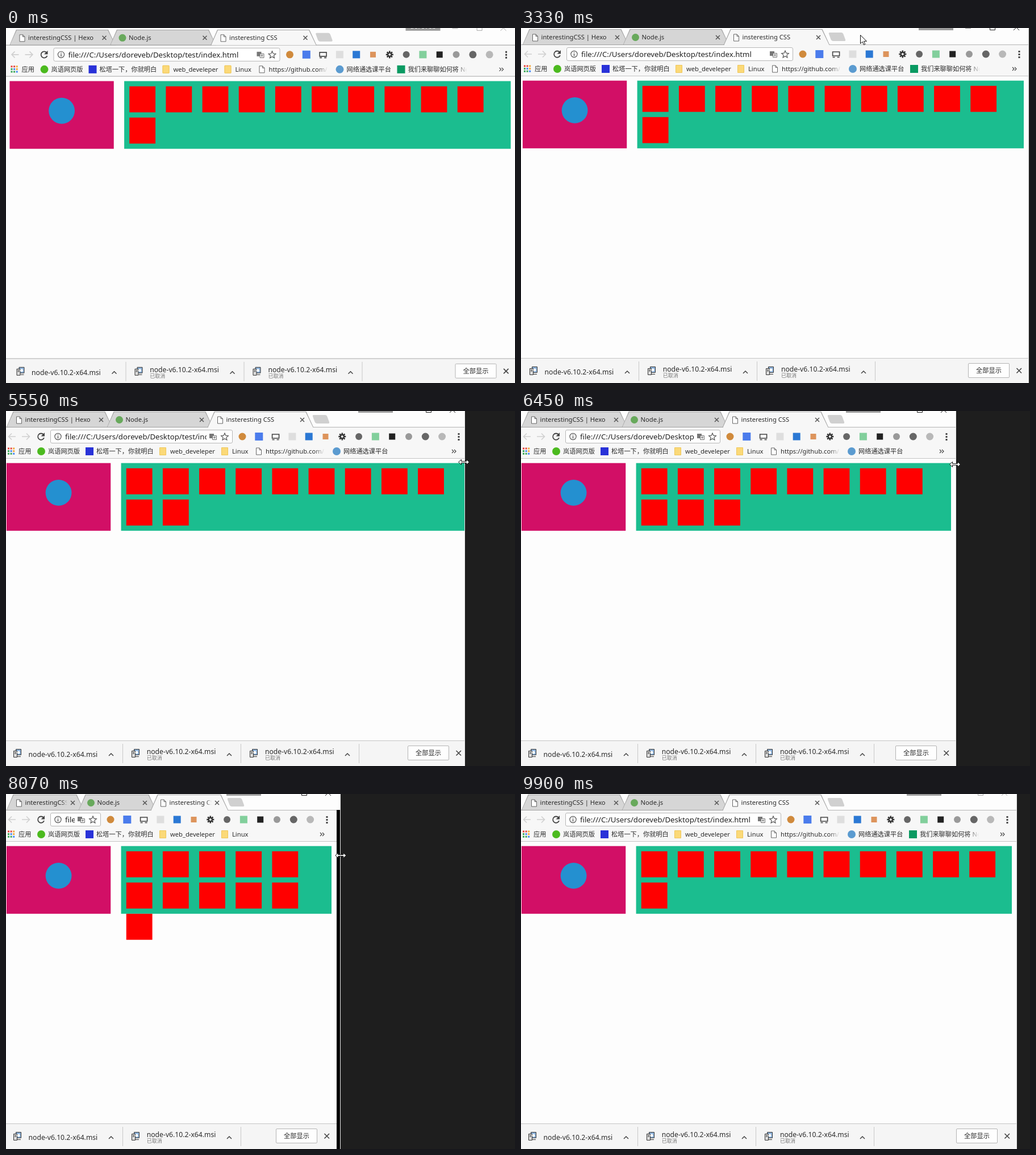
These frames come from a looping animation (896x625 px, 9930 ms). An HTML page:

```html
<!DOCTYPE html>
<html lang="zh">
<head>
<meta charset="utf-8">
<title>Resizing a window</title>
<style>
html, body { margin: 0; width: 100%; height: 100%; overflow: hidden; background: #1e1e1e; }
body { position: relative; font: 11.2px/16px "Noto Sans", "Noto Sans CJK SC", "Noto Sans CJK", sans-serif; color: #2b2b2b; }
div, span, svg { position: absolute; white-space: nowrap; }
svg { overflow: visible; }
/* The window reaches a little past the left and top of the stage. */
#win, #ui { left: 0; top: 0; height: 640px; clip-path: inset(-8px 0 0 -8px); }
#win { background: #000; }
#win::after { content: ""; position: absolute; right: 0; top: 0; width: 1px; height: 100%; background: #e8e8e8; }
#bar { left: -8px; right: 0; top: -8px; height: 36px; background: #fdfdfd; }
#btns { right: 0; top: 0; stroke: #222; fill: none; }
.idle #btns { stroke: #aaa; }
#badge { right: 133px; top: -14px; width: 61px; height: 17px; background: #9b9b9b; color: #fff; text-align: center; font-size: 12px; line-height: 18px; }

#tools, #page, #shelf { left: -8px; right: 0; box-sizing: border-box; }
#tools { top: 28px; height: 55px; background: #f7f7f7; border-top: 1px solid #b4b4b4; }
.tab { top: 1px; height: 28px; background: #a3a3a3; clip-path: polygon(0 100%, 12px 0, calc(100% - 13px) 0, 100% 100%); }
.tab::before { content: ""; position: absolute; inset: 1px 1px 1px; background: #d6d6d6; clip-path: inherit; }
.tab.on { z-index: 1; }
.tab.on::before { background: #f7f7f7; bottom: 0; }
.tab span { left: 33px; right: 30px; top: 6px; overflow: hidden; -webkit-mask: linear-gradient(90deg, #000 calc(100% - 10px), transparent); mask: linear-gradient(90deg, #000 calc(100% - 10px), transparent); }
.tab .ic { left: 15px; top: 8px; }
.tab .x { right: 16px; top: 10px; }
#plus { top: 7px; width: 31px; height: 15px; background: #d0d0d0; border-radius: 3px; transform: skewX(20deg) scaleX(.82); }

#url { left: 78px; right: 415px; top: 33px; height: 24px; border: 1px solid #b6b6b6; border-radius: 3px; background: #fff; box-sizing: border-box; }
#url span { left: 25px; right: 45px; top: 2px; overflow: hidden; font-size: 13.2px; line-height: 19px; color: #222; }
.mark { top: 63px; height: 16px; }
.mark i { position: absolute; left: -19px; top: 1px; width: 14px; height: 14px; }
.fade { -webkit-mask: linear-gradient(90deg, #000 82%, transparent); mask: linear-gradient(90deg, #000 82%, transparent); overflow: hidden; width: 104px; position: absolute; }

#page { top: 83px; height: 497px; background: #fdfdfd; border-top: 1px solid #c4c4c4; }
#shelf { top: 580px; height: 60px; background: #f5f5f5; border-top: 1px solid #c4c4c4; }
.dl { top: 5px; width: 208px; height: 34px; border-right: 1px solid #c8c8c8; box-sizing: border-box; }
.dl span { left: 42px; font-size: 12.2px; }
.dl em { position: absolute; left: 42px; top: 18px; font: 9px/14px "Noto Sans CJK SC", "Noto Sans CJK", sans-serif; color: #777; }
#all { right: 34px; top: 8px; width: 73px; height: 26px; border: 1px solid #b4b4b4; border-radius: 2px; background: #fefefe; box-sizing: border-box; text-align: center; line-height: 24px; }
.cur { left: 0; top: 0; fill: #fff; stroke: #111; }
</style>
</head>
<body>
<div id="win">
  <div id="bar"></div>
  <svg id="btns" width="110" height="28" viewBox="-110 0 110 28"><path d="M-112-1h10M-68.5-7h9v9.5h-9zM-27-7l10 10M-17-7l-10 10"/></svg>
  <div id="ui">
    <div id="badge">doreveb</div>
    <div id="tools"></div>
    <div id="plus"></div>
    <div id="url"><span>file:///C:/Users/doreveb/Desktop/test/index.html</span></div>
    <svg width="100" height="84" fill="none" stroke="#555" stroke-width="1.6">
      <path stroke="#d0d0d0" d="M17 45H5M10 39.500l-5.500 5.500 5.500 5.500M28 45h13M36 39.500l5.500 5.500-5.500 5.500"/>
      <path stroke="#444" stroke-width="1.800" d="M66 41.500a5.600 5.600 0 1 0 1 5.500"/>
      <path fill="#444" stroke="none" d="M68 38v6.500h-6.500z"/>
      <circle cx="91.500" cy="45" r="5.600" stroke-width="1.200"/>
      <path stroke-width="1.400" d="M91.500 44v4.500M91.500 41.300v1.500"/>
      <g id="apps" stroke="none"></g>
    </svg>
    <svg style="right:0" width="470" height="84" viewBox="-470 0 470 84">
      <path fill="#777" d="M-456 40h8v8h-8z"/>
      <path fill="#eee" stroke="#777" d="M-450.500 43.500h7v7h-7z"/>
      <path fill="#777" d="M-449 46h4v1h-4zM-447.500 45h1v4h-1z"/>
      <path fill="none" stroke="#555" stroke-width="1.200" d="M-429 39l1.800 4.200 4.500.4-3.400 3 1 4.400-3.900-2.300-3.900 2.300 1-4.400-3.400-3 4.500-.4z"/>
      <g id="exts"></g>
      <path fill="#444" d="M-18.500 39h3v3h-3zM-18.500 44h3v3h-3zM-18.500 49h3v3h-3z"/>
      <path fill="none" stroke="#444" stroke-width="1.200" d="M-29 68l3 3-3 3M-25 68l3 3-3 3"/>
    </svg>
    <div id="page"></div>
    <svg width="1" height="1" style="left:0;top:0">
      <g transform="scale(.91667)">
        <rect x="1" y="100" width="200" height="130" fill="#d20f66"/>
        <circle cx="101" cy="157" r="25" fill="#2490d0"/>
        <rect id="green" x="221" y="100" height="130" fill="#1bbd8f"/>
        <g id="tiles" fill="#f00"></g>
      </g>
    </svg>
    <div id="shelf">
      <div id="all">全部显示</div>
      <svg style="right:0;top:0" width="30" height="40" viewBox="-30 0 30 40"><path stroke="#444" stroke-width="1.600" d="M-21.500 17l8.500 8.500M-13 17l-8.500 8.500"/></svg>
    </div>
  </div>
</div>
<svg class="cur" id="arrow" width="12" height="19"><path d="M.5.500v15l3.500-3.300 2.500 5.500 2.300-1-2.400-5.400h5z"/></svg>
<svg class="cur" id="sizer" width="20" height="10"><path d="M-9.500 0l5-4.500v3.200h9v-3.200l5 4.500-5 4.500V1.300h-9v3.200z"/></svg>
<script>
const $ = id => document.getElementById(id);
const LOOP = 9930, STEP = 30, ZOOM = .91667;

function add(parent, cls, html, css = '') {
  const el = document.createElement('div');
  el.className = cls;
  el.innerHTML = html;
  el.style.cssText = css;
  parent.append(el);
  return el;
}

const docIcon = '<svg class="ic" width="12" height="14" style="left:16px"><path d="M1.500 1h5.500l3.500 3.500v8.500h-9zM7 1v3.500h3.500" fill="#fff" stroke="#666"/></svg>';
const cross = '<svg class="x" width="9" height="9"><path d="M1 1l7 7M8 1l-7 7" stroke="#555" stroke-width="1.500"/></svg>';
const greenDot = '<div class="ic" style="width:13px;height:13px;border-radius:50%;background:#68a95c"></div>';

const tabs = [[docIcon, 'interestingCSS | Hexo'], [greenDot, 'Node.js'], [docIcon, 'insteresting CSS']]
  .map(([icon, title], i) => add($('ui'), i === 2 ? 'tab on' : 'tab', `${icon}<span>${title}</span>${cross}`));

// Bookmarks: left, right end, label, icon style
const folder = 'background:#fbd978;border-radius:1px;outline:1px solid #eec65a;outline-offset:-1px;width:12px';
const round = c => `background:${c};border-radius:50%`;
const marks = [
  [22, 44, '应用', ''],
  [74, 130, '岚语网页版', round('#4cba1f')],
  [159, 259, '松塔一下，你就明白', 'background:#2932d8'],
  [289, 368, 'web_develeper', folder],
  [398, 426, 'Linux', folder],
  [457, 561, '<span class="fade">https://github.com/</span>', 'doc'],
  [594, 671, '网络通选课平台', round('#5b9bd0')],
  [702, 808, '<span class="fade">我们来聊聊如何将 Nginx</span>', 'background:#0a9a62']
].map(([x, end, label, look]) => {
  const icon = look === 'doc'
    ? docIcon.replace('left:16px', 'left:-18px;top:1px')
    : `<i style="${look}"></i>`;
  return { end, el: add($('ui'), 'mark', icon + label, `left:${x}px`) };
});

const dots = ['#e8453c', '#e8453c', '#f2a73b', '#3aa757', '#4285f4', '#f2a73b', '#3aa757', '#3aa757', '#4285f4'];
$('apps').innerHTML = dots.map((c, i) =>
  `<rect x="${3 + i % 3 * 4.6}" y="${64.5 + Math.floor(i / 3) * 4.6}" width="3" height="3" fill="${c}"/>`).join('');

const disc = (r, c) => `<circle r="${r}" fill="${c}"/>`;
const box = (s, c) => `<rect x="${-s / 2}" y="${-s / 2}" width="${s}" height="${s}" fill="${c}"/>`;
const gear = disc(4.2, '#333') + [0, 45, 90, 135].map(a =>
  `<path d="M0-6.500v13" stroke="#333" stroke-width="2.600" transform="rotate(${a})"/>`).join('') + disc(2, '#f7f7f7');
const screen = '<path d="M-6 3v-7h12v7zM-6 5.500h4M2 5.500h4" fill="none" stroke="#444" stroke-width="1.600"/>';
$('exts').innerHTML = [
  disc(6.5, '#d08a3c'), box(14, '#4b7cec'), screen, box(13, '#dedede'), box(13, '#2b78d4'),
  box(10, '#dd945c'), gear, disc(6, '#666'), box(13, '#82cf9c'), box(11, '#222'),
  disc(6, '#999'), disc(6.5, '#666'), disc(6.5, '#b8b8b8')
].map((s, i) => `<g transform="translate(${-398 + i * 29.3} 45)">${s}</g>`).join('');

$('tiles').innerHTML = '<rect width="50" height="50"/>'.repeat(11);
const tiles = [...$('tiles').children];

const setup = '<svg style="left:14px;top:8px" width="16" height="17"><path d="M5.500 1.500h9v10h-9z" fill="#8fb4dc" stroke="#333"/><path d="M1.500 4.500h6v11h-6z" fill="#ddd" stroke="#333"/><path d="M3 7h3M3 9h3M8 14.500h6" stroke="#333"/><circle cx="10" cy="7" r="2.500" fill="#fff"/></svg>';
const chevron = '<svg style="left:182px;top:15px" width="10" height="7"><path d="M1 6l4-4 4 4" fill="none" stroke="#444" stroke-width="1.500"/></svg>';
const downloads = [0, 1, 2].map(i => add($('shelf'), 'dl',
  `${setup}<span style="top:${i ? 6 : 11}px">node-v6.10.2-x64.msi</span>${i ? '<em>已取消</em>' : ''}${chevron}`,
  `left:${5.5 + i * 208.2}px`));

// Linear track through rows of [time, value, ...]
function track(rows, t) {
  const n = rows.findIndex(r => r[0] > t);
  if (n === 0) return rows[0].slice(1);
  if (n < 0) return rows[rows.length - 1].slice(1);
  const a = rows[n - 1], b = rows[n], k = (t - a[0]) / (b[0] - a[0]);
  return a.slice(1).map((v, i) => v + (b[i + 1] - v) * k);
}

const edgeKeys = [
  [4410, 892], [4470, 914], [4600, 930], [4900, 935], [5160, 935], [5455, 818], [5490, 814], [5550, 808], [6060, 766],
  [6450, 766], [7020, 668], [7080, 662], [7440, 607], [7560, 582],
  [8040, 582], [8250, 630], [8425, 728], [8460, 745], [8520, 775], [8700, 820], [9030, 857], [9420, 857], [9540, 873]
];
const moveKeys = [[2700, 5.5, 1.83], [3030, 2, 1], [3330, 2, 1], [3600, 0, 0]];
const arrowKeys = [
  [59, 920, 110], [60, 892, 100], [180, 884, 115], [300, 900, 121], [569, 900, 121],
  [570, 866, 0], [750, 840, 70], [1050, 660, 40], [1290, 620, 11], [1440, 620, 11], [1860, 900, 60],
  [2250, 900, 60], [2700, 600, 13], [3030, 597, 12], [3330, 597, 12], [3600, 595, 11], [4110, 900, 88]
];
// Resize pointer: offset from the edge, height
const sizerKeys = [[5550, -2, 90], [6450, -2, 94], [7080, -6, 95], [7440, 0, 98], [8040, 0, 108], [8520, 5, 111], [9030, 0, 111]];

const edgeAt = t => Math.round(track(edgeKeys, t)[0]);
const place = (el, x, y) => { el.style.transform = `translate(${x}px,${y}px)`; };
const show = (el, on) => { el.style.visibility = on ? 'visible' : 'hidden'; };

function layTiles(page) {
  const width = (page - 9) / ZOOM - 221;
  const perRow = Math.floor(width / 70);
  $('green').setAttribute('width', width);
  tiles.forEach((el, i) => {
    el.setAttribute('x', 231 + i % perRow * 70);
    el.setAttribute('y', 110 + Math.floor(i / perRow) * 60);
  });
}

function draw(now) {
  const t = Math.floor(now % LOOP / STEP) * STEP;
  const edge = edgeAt(t);
  const ui = edgeAt(t - 60);      // browser frame trails the window edge

  place($('win'), ...track(moveKeys, t));
  $('win').style.width = edge + 'px';
  $('win').className = t < 1200 || t >= 9900 ? 'idle' : '';
  $('ui').style.width = ui + 'px';
  layTiles(edgeAt(t - 95));       // page layout trails a little more

  const pitch = Math.min(177, (ui - 201) / 3);
  tabs.forEach((el, i) => {
    el.style.left = i * pitch + .5 + 'px';
    el.style.width = pitch + 10 + 'px';
  });
  $('plus').style.left = 3 * pitch + 8 + 'px';

  marks.forEach(m => show(m.el, m.end < ui - 40));
  downloads.forEach((el, i) => show(el, 205 + i * 208 < ui - 107));

  place($('arrow'), ...track(arrowKeys, t));
  const [dx, y] = track(sizerKeys, t);
  place($('sizer'), edge + dx, y);
  show($('sizer'), t >= 5160 && t < 9600);
}

function tick() {
  draw(performance.now());
  requestAnimationFrame(tick);
}
tick();
</script>
</body>
</html>
```
